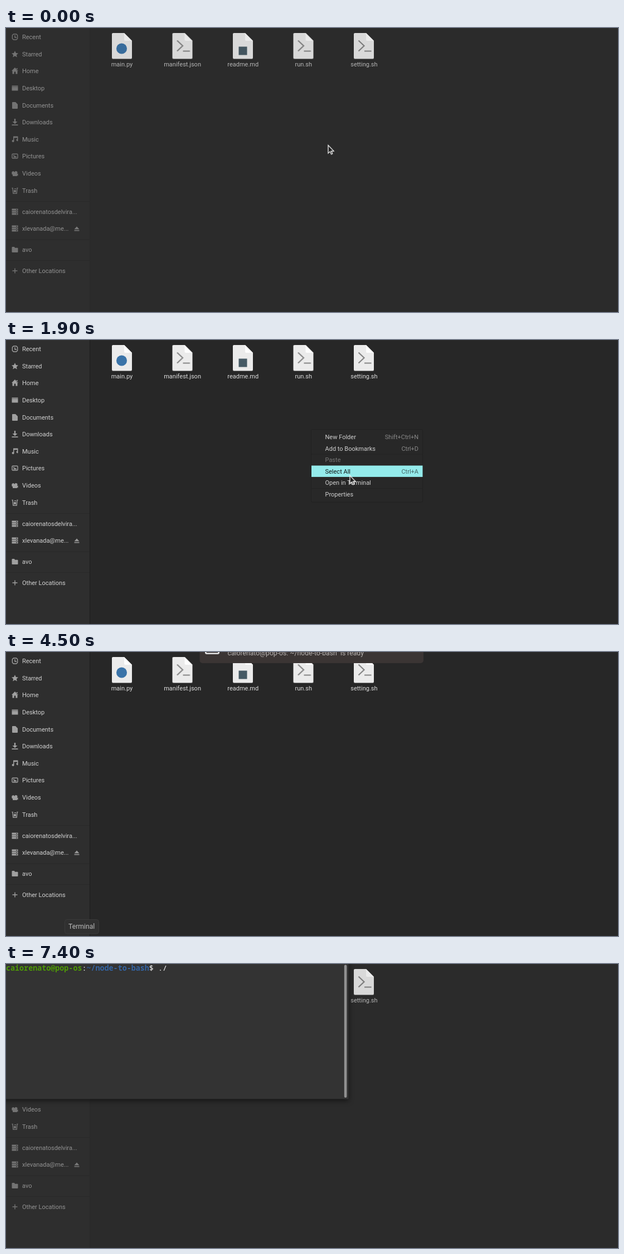
An HTML page for the animation above (8000 ms loop, 1098 by 510 pixels).

```html
<!DOCTYPE html>
<html lang="en">
<head>
<meta charset="utf-8">
<title>Opening a terminal from the file manager</title>
<style>
  html, body { margin: 0; width: 100%; height: 100%; overflow: hidden; background: #272727; }
  svg { display: block; width: 100%; height: 100%; }
  text { font: 11px Roboto, "Open Sans", sans-serif; fill: currentColor; white-space: pre; }
  .shell text { font-size: 12.2px; }
  .glyph { opacity: .7; fill: currentColor; }
  .line { fill: none; stroke: currentColor; stroke-width: 1.4; }
  .prompt { font: 13.38px "Noto Sans Mono", "DejaVu Sans Mono", monospace; fill: #fff; }
  .bold { font-weight: bold; }
  #terminal { filter: drop-shadow(0 3px 5px rgba(0, 0, 0, .55)); }
</style>
</head>
<body>
<script>
const LOOP = 8000;

// label, centre y, filled path, outlined path
const places = [
  ['Recent', 16, '', 'M-2.5-5H2.5L4.6-3V3L2.5 5H-2.5L-4.6 3V-3ZM0-3V1H3'],
  ['Starred', 47, 'M0-6L1.8-2 6-1.6 2.8 1.2 3.8 5.6 0 3.2-3.8 5.6-2.8 1.2-6-1.6-1.8-2Z', ''],
  ['Home', 77, 'M0-6L6 0H4.5V5.5H1.3V1.5H-1.3V5.5H-4.5V0H-6ZM3-5H4.5V-1H3Z', ''],
  ['Desktop', 108, 'M-5.5-4.5H5.5V-3H-5.5ZM-5.5-2.4H5.5V4.5H-5.5Z', ''],
  ['Documents', 139, 'M-4-6H1L5-2V5A1 1 0 0 1 4 6H-4A1 1 0 0 1-5 5V-5A1 1 0 0 1-4-6Z', ''],
  ['Downloads', 169, 'M-1.2-6H1.2V-1H4.5L0 3.3-4.5-1H-1.2ZM-5.5 4.3H5.5V6H-5.5Z', ''],
  ['Music', 200, 'M-3-5.5H5.5V3A2.1 2 0 1 1 4-1V-2.8H-1.5V4A2.1 2 0 1 1-3 1Z', ''],
  ['Pictures', 230, 'M-3 2.5L-1-1 .5 .8 1.6-.4 3.2 2.5ZM-3-2H-1V-.5H-3Z', 'M-4-3.8H4L5-3V3L4 4H-4L-5 3V-3Z'],
  ['Videos', 261, 'M-5.5 0A2.5 2.5 0 1 1-.5-2 2.5 2.5 0 1 1 4 0V1L5.5 0V4.5L4 3.5V5H-4V2H-5.5Z', ''],
  ['Trash', 292, 'M-2-1H2V3H-2ZM-1-4H2V-2.5H-1Z', 'M-5.5-4.5H-4L-3.2 5H3.2L4-4.5H5.5'],
  ['caiorenatosdelvira...', 330, 'server'],
  ['xlevanada@me...', 360, 'server'],
  ['avo', 398, 'M-5.5-4A1 1 0 0 1-4.5-5H-1L0-3.3H4.5A1 1 0 0 1 5.5-2.3V4A1 1 0 0 1 4.5 5H-4.5A1 1 0 0 1-5.5 4Z', ''],
  ['Other Locations', 436, '', 'M-4.5 0H4.5M0-4.5V4.5'],
];
const server = [-5.5, -1.6, 2.3].map(y => `M-5.5 ${y}h11v3.2h-11zM2 ${y + 1}v1.2h2v-1.2z`).join('');

const script = '<path d="M8.5 13.5L18.5 23 8.5 32.5M19 32.5H31.5" fill="none" stroke="#858585" stroke-width="2.2"/>';
const files = [
  ['main.py', '<circle cx="17.5" cy="28" r="9.5" fill="#3a73a8"/>'],
  ['manifest.json', script],
  ['readme.md', '<rect x="10.5" y="24.5" width="15" height="15" fill="#465a65"/>'],
  ['run.sh', script],
  ['setting.sh', script],
];

// label, centre y, shortcut, hover start, hover end
const menu = [
  ['New Folder', 174, 'Shift+Ctrl+N', 1600, 1700],
  ['Add to Bookmarks', 194.5, 'Ctrl+D', 1700, 1800],
  ['Paste', 215, ''],
  ['Select All', 235.5, 'Ctrl+A', 1900, 2000],
  ['Open in Terminal', 256.2, '', 2000, 2700],
  ['Properties', 277, ''],
];

const drawPlace = ([label, y, fill, line = '']) => `
  <g transform="translate(16 ${y})">
    <path class="glyph" fill-rule="evenodd" d="${fill === 'server' ? server : fill}"/>
    <path class="glyph line" style="fill:none" d="${line}"/>
    <text x="13" y="4">${label}</text>
  </g>`;

const page = 'M2 0H22L36 14V44a2 2 0 0 1-2 2H2a2 2 0 0 1-2-2V2a2 2 0 0 1 2-2Z';
const drawFile = ([label, mark], i) => `
  <g class="icon" transform="translate(${190 + 108.5 * i} 9)">
    <path d="${page}" fill="#808080" transform="translate(0 1)"/>
    <path d="${page}" fill="#ebebeb"/>
    <path d="M22 0L36 14H24a2 2 0 0 1-2-2Z" fill="#fdfdfd"/>${mark}
  </g>
  <text x="${208 + 108.6 * i}" y="68.5" text-anchor="middle">${label}</text>`;

const rowText = (label, y, keys, ink, keyInk) => `
  <text x="572.5" y="${y + 4}" style="fill:${ink}">${label}</text>
  <text x="740" y="${y + 4}" text-anchor="end" style="fill:${keyInk}">${keys}</text>`;
const drawRow = ([label, y, keys, from], i) =>
  rowText(label, y, keys, label === 'Paste' ? '#777' : '#d0d0d0', '#888') + (from ? `
  <g id="hover${i}">
    <rect x="548" y="${y - 10}" width="199.5" height="20.4" fill="#94ebeb"/>
    ${rowText(label, y, keys, '#101818', '#446868')}
  </g>` : '');

document.body.innerHTML = `
<svg viewBox="0 0 1098 510">
  <rect id="desk" width="1098" height="510"/>
  <g id="files">${files.map(drawFile).join('')}</g>

  <rect width="150" height="510" fill="#2e2e2e"/>
  <path id="edge" d="M150.5 0V510"/>
  <path d="M0 311.5H150M0 380H150M0 417.5H150" stroke="#292929"/>
  <g id="places">${places.map(drawPlace).join('')}</g>
  <path id="eject" d="M127 356.5L131.5 361.5H122.5ZM122.5 363H131.5V364.6H122.5Z" fill="currentColor"/>

  <g id="menu">
    <rect x="547.5" y="160.5" width="200" height="130.5" rx="2" fill="#282828" stroke="#212121"/>
    <path d="M548 205H747M548 246H747M548 266.8H747" stroke="#232323"/>
    ${menu.map(drawRow).join('')}
  </g>

  <g id="terminal">
    <rect x="-20" y="-30" width="634.5" height="272.5" fill="#333"/>
    <rect x="606.8" y="1.5" width="4.6" height="238.5" rx="2.3" fill="#909090"/>
    <text class="prompt" x="0" y="12"><tspan class="bold" fill="#4e9a06">caiorenato@pop-os</tspan>:<tspan class="bold" fill="#3465a4">~/node-to-bash</tspan>$ <tspan id="dot">.</tspan><tspan id="slash">/</tspan></text>
    <rect id="block" width="8" height="16" fill="#fff"/>
  </g>

  <g id="notice" class="shell">
    <rect x="347.5" y="-60" width="401.5" height="80" rx="5" fill="#3b3534"/>
    <rect x="358.3" y="-17" width="23.4" height="19.7" rx="2" fill="#3b3534" stroke="#e4e4e4" stroke-width="2.6"/>
    <path d="M363-5H368M370-5H378" stroke="#e4e4e4" stroke-width="2.4"/>
    <text x="394" y="6" style="fill:#b8b4b2">"caiorenato@pop-os: ~/node-to-bash" is ready</text>
  </g>

  <g id="tip" class="shell">
    <rect x="105.5" y="480.5" width="61" height="25.5" rx="4" fill="#303030" stroke="#3a3a3a"/>
    <text x="112" y="497.3" style="fill:#bababa">Terminal</text>
  </g>

  <path id="arrow" d="M0 0V14.5L3.4 11.4 5.6 16.2 7.8 15.2 5.6 10.6H10.2Z" fill="#222" stroke="#fff" stroke-width="1.2"/>
  <path id="beam" d="M-3.5-7.5H3.5M0-7.5V7.5M-3.5 7.5H3.5" stroke="#e8e8e8" stroke-width="1.3"/>
</svg>`;

// Plays [ms, value] pairs as hard steps; the first pair starts at 0.
function play(selector, prop, table) {
  const frames = table.map(([ms, value]) => ({ offset: ms / LOOP, [prop]: value, easing: 'steps(1, end)' }));
  frames.push({ offset: 1, [prop]: table.at(-1)[1] });
  for (const el of document.querySelectorAll(selector))
    el.animate(frames, { duration: LOOP, iterations: Infinity });
}
const move = (selector, table) =>
  play(selector, 'transform', table.map(([ms, x, y]) => [ms, `translate(${x}px, ${y}px)`]));
const show = (selector, from, to = LOOP) =>
  play(selector, 'opacity', [[0, 0], [from, 1], ...(to < LOOP ? [[to, 0]] : [])]);

// Window focus
play('#desk', 'fill', [[0, '#2b2b2b'], [1100, '#272727'], [4600, '#292929'], [4700, '#2b2b2b']]);
play('#edge', 'stroke', [[0, '#2a2a2a'], [1100, '#1e1e1e'], [4700, '#2a2a2a']]);
play('#files', 'color', [[0, '#b4b4b4'], [1100, '#dcdcdc'], [4600, '#c8c8c8'], [4700, '#b4b4b4']]);
play('.icon', 'opacity', [[0, .91], [1100, 1], [4700, .91]]);
play('#places', 'color', [[0, '#929292'], [1200, '#b4b4b4'], [1300, '#d2d2d2'], [4600, '#bcbcbc'], [4700, '#a0a0a0'], [4800, '#929292']]);
play('#eject', 'color', [[0, '#7a7a7a'], [1100, '#c0c0c0'], [1200, '#aaa'], [1300, '#989898'], [4700, '#7a7a7a']]);

// Context menu
show('#menu', 1100, 2700);
menu.forEach(([, , , from, to], i) => from && show('#hover' + i, from, to));

// Notification and dock tooltip
play('#notice', 'opacity', [[0, 0], [2700, .4], [2800, .85], [2900, 1], [4600, .5], [4700, 0]]);
move('#notice', [[0, 0, 4], [2800, 0, 2], [2900, 0, 0], [4600, 0, -5]]);
play('#tip', 'opacity', [[0, 0], [4500, 1], [4700, .5], [4800, 0]]);

// Terminal
show('#terminal', 4600);
show('#dot', 6700);
show('#slash', 6800);
move('#block', [[0, 273, 0], [6700, 281, 0], [6800, 289, 0]]);
play('#block', 'opacity', [[0, 1], [5200, 0], [5800, 1], [6400, 0], [6700, 1], [7400, 0]]);

// Pointer
move('#arrow', [
  [0, 578, 210.5], [400, 562, 196], [500, 542, 177], [600, 533, 164], [700, 545.5, 159.5],
  [1500, 549, 163], [1600, 563, 176], [1700, 584, 197], [1800, 606, 223], [1900, 617, 243.5],
  [2000, 617.5, 249], [2100, 616.5, 253],
  [3600, 594, 269], [3700, 500, 340], [3800, 352, 424], [3900, 204.5, 483], [4000, -50, 530],
  [4800, 400, 425], [4900, 452, 335], [5000, 453, 262], [5100, -50, 530],
]);
move('#beam', [[0, -50, 0], [5100, 444, 190], [5200, 436, 138], [5500, 441, 144], [5600, 448, 151], [5700, 452, 155], [6700, -50, 0]]);
</script>
</body>
</html>
```
